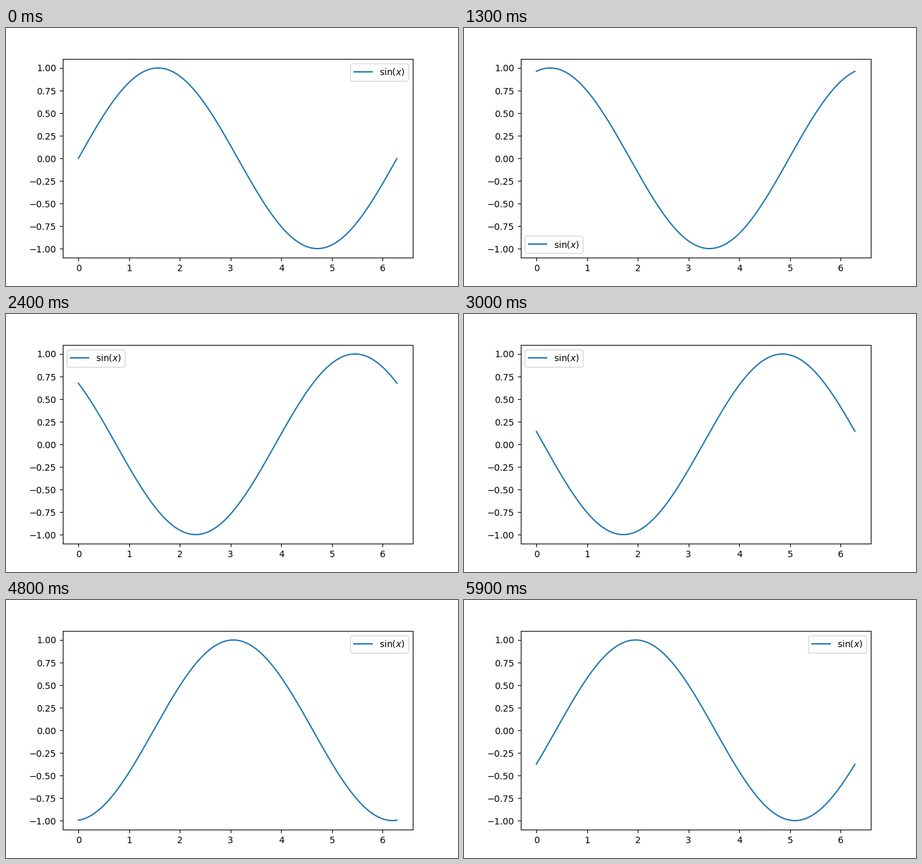
A matplotlib script for the animation above (6000 ms loop, 700 by 400 pixels).

```python
import numpy as np
import matplotlib.pyplot as plt
from matplotlib.animation import FuncAnimation

FRAMES = 60
INTERVAL = 100  # ms

fig, ax = plt.subplots(figsize=(7, 4), dpi=100)
x = np.arange(0, 2 * np.pi, 0.01)
line, = ax.plot(x, np.sin(x), label=r"$\sin(x)$")
# "best" is worked out anew on every draw, so the legend dodges the curve
ax.legend(loc="best")


def update(i):
    line.set_ydata(np.sin(x + i / 10))
    return line,


anim = FuncAnimation(fig, update, frames=FRAMES, init_func=lambda: update(0),
                     interval=INTERVAL, repeat=True, repeat_delay=0, blit=False)
plt.show()
```
